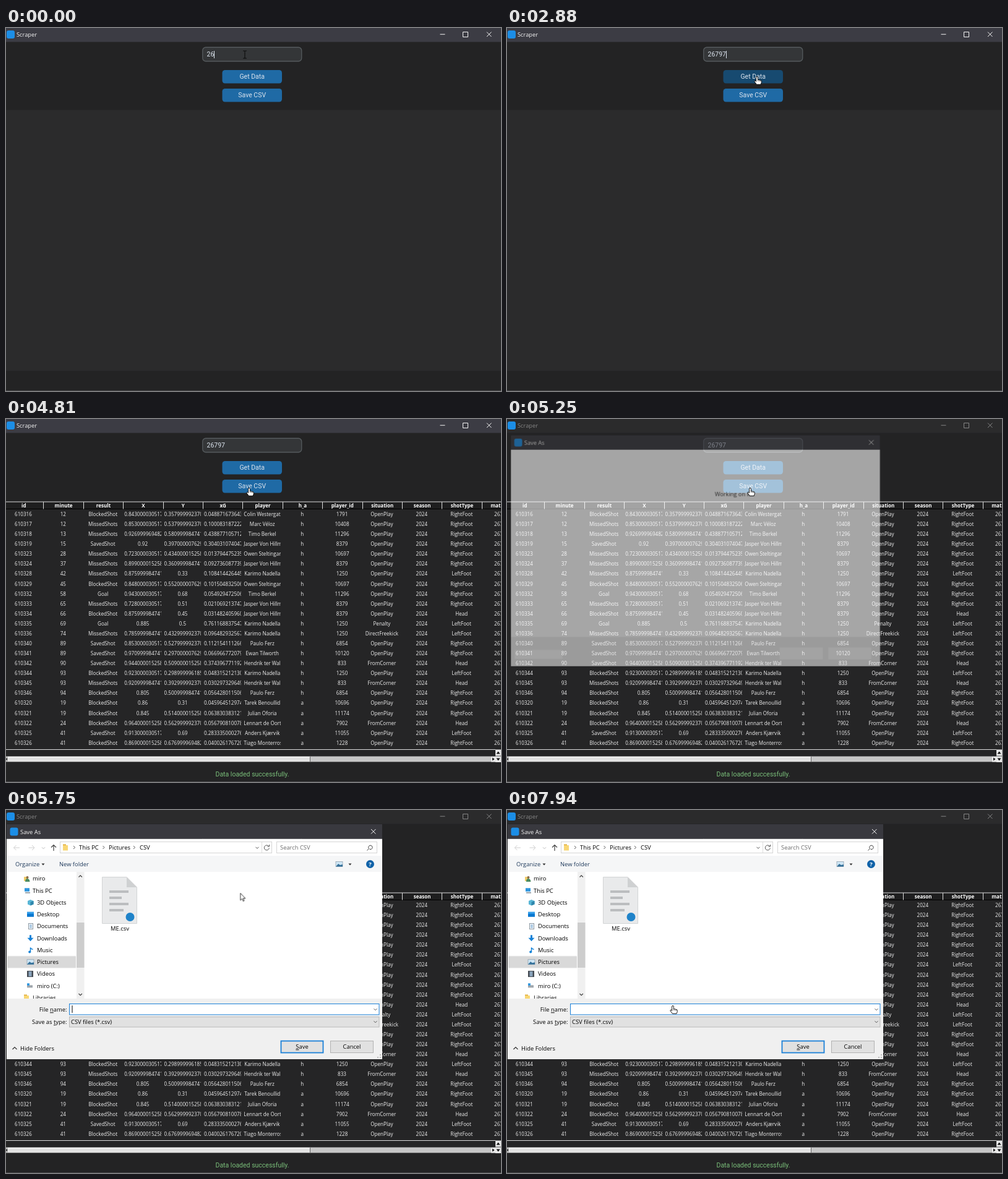
Animation, 800 px wide and 587 px high, one loop 8000 ms. Source, as an HTML page:

```html
<!DOCTYPE html>
<html lang="en">
<head>
<meta charset="utf-8">
<title>Scraper</title>
<style>
html, body { margin: 0; width: 100%; height: 100%; overflow: hidden; background: #232324; }
svg.layer { position: absolute; left: 0; top: 0; }
svg { font-family: "Open Sans", "Noto Sans", sans-serif; }
.roboto { font: 10.5px Roboto, sans-serif; }
.anim, .anim::after { animation: 8s step-end infinite; }

.bar { color: #f4f4f4; fill: #3c3c44; animation-name: deactivate; }
@keyframes deactivate { 64.9%, 100% { color: #858585; fill: #2b2b2c; } }
.get { fill: #1f6aa5; animation-name: hover-get; }
@keyframes hover-get { 18% { fill: #174a70; } 20.2% { fill: #1f6aa5; } 22.8% { fill: #174a70; } 48.3%, 100% { fill: #1f6aa5; } }
.save { fill: #1f6aa5; animation-name: hover-save; }
@keyframes hover-save { 20.6% { fill: #174a70; } 22% { fill: #1f6aa5; } 50.4% { fill: #174a70; } 59.4%, 100% { fill: #1f6aa5; } }

.entry { position: absolute; left: 324.5px; top: 36px; width: 30px; height: 13px; line-height: 13px;
  overflow: hidden; color: #dce4ee; animation-name: type; }
@keyframes type { 0% { width: 12.6px; } 3% { width: 18.5px; } 6% { width: 24.3px; } 11%, 100% { width: 30.1px; } }
.entry::after { content: ""; position: absolute; right: 0; top: 1px; width: 1px; height: 12px; background: #dce4ee; animation-name: entry-caret; }
@keyframes entry-caret { 18.5% { opacity: 0; } 22.2% { opacity: 1; } 45.7% { opacity: 0; } 49.5% { opacity: 1; } 57%, 100% { opacity: 0; } }

.data { animation-name: load; }
@keyframes load { 0% { visibility: hidden; } 38.25%, 100% { visibility: visible; } }
#table { position: absolute; left: -4px; top: 134px; width: 804px; height: 400px; overflow: hidden; display: grid;
  grid-template: 12px / repeat(13, 64.4px); grid-auto-rows: 16.09px; align-content: start;
  background: #252526; color: #f0f0f0; font: 8.1px "Open Sans", "Noto Sans", sans-serif; text-align: center; }
#table > * { overflow: hidden; white-space: nowrap; line-height: 16.5px; }
#table > span { margin: 0 2.6px 0 2px; }
#table > b { line-height: 12px; font-size: 8px; color: #fff; background: #1e1e1f; box-sizing: border-box;
  border: solid #ddd; border-width: 0 0 1px 1px; border-bottom-color: #000; }

.dialog { transform-origin: 304.5px 213px; animation: open 8s linear infinite; font-size: 9.4px; }
@keyframes open {
  0%, 64.9% { opacity: 0; transform: scale(.965); }
  65.6% { opacity: .58; transform: scale(.982); }
  66.4% { opacity: .86; transform: scale(.992); }
  67.2% { opacity: .95; transform: scale(.997); }
  68%, 100% { opacity: 1; transform: none; }
}
.loading { animation-name: loading; }
@keyframes loading { 66.6%, 100% { opacity: 0; } }
.content { animation-name: content; }
@keyframes content { 0% { opacity: 0; } 66.6%, 100% { opacity: 1; } }
.tree { animation-name: scroll; }
@keyframes scroll { 68.75%, 100% { transform: translateY(-186.5px); } }
.thumb { animation-name: thumb; }
@keyframes thumb { 0% { y: 114px; height: 109px; } 68.75%, 100% { y: 182px; height: 73px; } }
.caret { animation-name: name-caret; }
@keyframes name-caret { 73.5% { opacity: 0; } 80.1% { opacity: 1; } 86.7% { opacity: 0; } 93.4% { opacity: 1; } 98.8%, 100% { opacity: 0; } }

.pointer { animation: move 8s ease-in-out infinite; }
@keyframes move {
  0%, 12% { transform: translate(386px, 43px); }
  18% { transform: translate(396px, 66px); }
  21% { transform: translate(399px, 98px); }
  25% { transform: translate(402px, 84px); }
  29.75%, 46% { transform: translate(404px, 79px); }
  54%, 70% { transform: translate(393px, 112px); }
  76.5% { transform: translate(312px, 240px); }
  79%, 100% { transform: translate(268px, 317px); }
}
.ibeam { animation-name: ibeam; }
@keyframes ibeam { 15% { opacity: 0; } 78.8% { opacity: 1; } 98.8%, 100% { opacity: 0; } }
.arrow { animation-name: arrow; }
@keyframes arrow { 0% { opacity: 0; } 15% { opacity: 1; } 18% { opacity: 0; } 70.8% { opacity: 1; } 78.8%, 100% { opacity: 0; } }
.hand { animation-name: hand; }
@keyframes hand { 0% { opacity: 0; } 18% { opacity: 1; } 70.8% { opacity: 0; } 98.8%, 100% { opacity: 1; } }
</style>
</head>
<body>
<svg class="layer" id="window" width="800" height="587"></svg>
<div class="entry roboto anim">26797</div>
<div class="data anim" id="table"></div>
<svg class="layer data anim" id="scrollbars" width="800" height="587"></svg>
<svg class="layer dialog" id="dialog" width="800" height="587"></svg>
<svg class="layer" width="800" height="587">
  <g class="pointer">
    <path class="ibeam anim" d="M-3 -6H-.8L0 -5.3L.8 -6H3M0 -5.3V5.3M-3 6H-.8L0 5.3L.8 6H3" fill="none" stroke="#0c0c0c" stroke-width="1.1"/>
    <path class="arrow anim" d="M0 0V11.5L2.7 9L4.5 13L6.2 12.2L4.5 8.4H8Z" fill="#fff" stroke="#000" stroke-width=".8"/>
    <g class="hand anim" stroke="#000" stroke-width=".9">
      <path d="M-1.4 1.2Q-1.4 -.6 0 -.6T1.4 1.2V4.6Q2.9 4 3.3 5.1Q4.8 4.5 5.2 5.6Q7.2 5.2 7.2 7.2V9.4L6 12.3H-.6L-4 7.8Q-4.5 6 -2.7 6.3L-1.4 7.5Z" fill="#fff"/>
      <path d="M1.4 4.6V7M3.3 5.1V7.3M5.2 5.6V7.6" fill="none" stroke-width=".6"/>
    </g>
  </g>
</svg>
<script>
const put = (id, html) => document.getElementById(id).innerHTML = html;
const rect = (x, y, w, h, fill, more = '') => `<rect x="${x}" y="${y}" width="${w}" height="${h}" fill="${fill}" ${more}/>`;
const line = (d, color, width = 1) => `<path d="${d}" fill="none" stroke="${color}" stroke-width="${width}"/>`;
const shape = (d, fill) => `<path d="${d}" fill="${fill}"/>`;
const text = (x, y, s, more = '') => `<text x="${x}" y="${y}" dy=".35em" ${more}>${s}</text>`;
const middle = 'text-anchor="middle"';
const chevron = (x, y, color = '#555') => line(`M${x - 2.5} ${y - 1.2}l2.5 2.5l2.5 -2.5`, color);
const button = (cls, y, label) =>
  `<rect class="${cls} anim" x="349.5" y="${y}" width="96.500" height="21.500" rx="4.5"/>` +
  text(397.7, y + 10.4, label, `class="roboto" fill="#dce4ee" ${middle}`);
const appIcon = (x, y) => rect(x, y, 13, 13, '#1c8ee6', 'rx="3"');

put('window',
  rect(0, 132.5, 800, 422, '#2b2b2c') +
  `<g class="bar anim"><rect width="800" height="22.5"/>` +
  text(17, 11, 'Scraper', 'font-size="9.3" style="fill:currentColor"') +
  line('M701.5 10.2h8M738.5 6.5h8v8h-8zM777 6.5l7.5 7.5m0 -7.5l-7.5 7.5', 'currentColor') + '</g>' +
  appIcon(1, 4) +
  rect(317.75, 31.25, 160, 22.5, '#343638', 'rx="5" stroke="#565b5e" stroke-width="1.3"') +
  button('get', 68, 'Get Data') + button('save', 98, 'Save CSV') +
  rect(0, 586, 800, 1, '#48484a'));

// Shots: id, minute, result, x %, y %, expected goals, player key, situation and foot
const results = { B: 'BlockedShot', M: 'MissedShots', S: 'SavedShot', G: 'Goal' };
const feet = { R: 'RightFoot', L: 'LeftFoot', H: 'Head' };
const situations = { O: 'OpenPlay', P: 'Penalty', D: 'DirectFreekick', C: 'FromCorner' };
const players = {
  a: ['Colin Westergate', 1791], b: ['Marc Véloz', 10408], c: ['Timo Berkel', 11296],
  d: ['Jasper Von Hillmar', 8379], e: ['Owen Steltingar', 10697], f: ['Karimo Nadella', 1250],
  g: ['Paulo Ferz', 6854], h: ['Ewan Tilworth', 10120], i: ['Hendrik ter Wal', 833],
  j: ['Tarek Benoullid', 10696], k: ['Julian Oforia', 11174], l: ['Lennart de Oort', 7902],
  m: ['Anders Kjærvik', 11055], n: ['Tiago Monterros', 1228]
};
const shots = `316 12 B 84.3 35.8 0.048871673643 a OR
317 12 M 85.3 53.8 0.100083187222 b OR
318 13 M 92.7 58.1 0.438877105712 c OR
319 15 S 92 39.7 0.304031074047 d OR
323 28 M 72.3 43.4 0.013794475235 e OR
324 37 M 89.9 36.1 0.092736087739 d OR
328 42 M 87.6 33 0.108414426445 f OL
329 45 B 84.8 55.2 0.101504832506 e OR
332 58 G 94.3 68 0.054929472506 c OR
333 65 M 72.8 51 0.021069213747 d OR
334 66 B 87.6 45 0.031482405960 d OH
335 69 G 88.5 50 0.761168837547 f PL
336 74 M 78.6 43.3 0.096482932567 f DL
340 89 S 85.3 52.8 0.112154111266 g OR
341 89 S 97.1 29.7 0.066966772079 h OR
342 90 S 94.4 50.9 0.374396771192 i CH
344 93 B 92.3 29.9 0.048315212130 f OL
345 93 M 92.1 39.3 0.030297329649 i CH
346 94 B 80.5 50.1 0.056428011506 g OR
320 19 B 86 31 0.045964512974 j OR
321 19 B 84.5 51.4 0.063830383121 k OR
322 24 B 96.4 56.3 0.056790810078 l CH
325 41 S 91.3 69 0.283335000276 m OL
326 41 B 86.9 67.7 0.040026176720 n OR`.split('\n');
const heads = 'id minute result X Y xG player h_a player_id situation season shotType match_id'.split(' ');
// Coordinates carry single-precision rounding
const share = v => String(Math.fround(v) / 100);
const rows = shots.map((s, i) => {
  const [id, minute, result, x, y, xg, key, kind] = s.split(' ');
  const [name, playerId] = players[key];
  return ['610' + id, minute, results[result], share(x), share(y), xg, name, i < 19 ? 'h' : 'a',
    playerId, situations[kind[0]], 2024, feet[kind[1]], 26797];
});
put('table', heads.map(h => `<b>${h}</b>`).join('') + rows.flat().map(c => `<span>${c}</span>`).join(''));

put('scrollbars',
  rect(0, 133.5, 800, 1, '#d8d8d8') + rect(0, 535, 800, 11, '#252526') + rect(0, 534, 791, 1, '#dcdcdc') +
  rect(0, 545.5, 791, 9.5, '#c6c6c6') + rect(3, 546, 488, 8.5, '#e2e2e2') +
  line('M3 546.5H491', '#fff') + line('M0 554.5H791M491.5 546V555', '#666') +
  rect(784, 546, 7, 8.5, '#e8e8e8') + shape('M786 547.5l3.5 2.5l-3.5 2.5z', '#111') + shape('M2 547.5v5l-2 -2.5z', '#111') +
  rect(791, 534.5, 9, 20.5, '#e8e8e8') + line('M791 545H800', '#555') +
  shape('M792.5 541.5h6l-3 -4zM792.5 548.5h6l-3 4z', '#111') +
  text(398, 574.5, 'Data loaded successfully.', `class="roboto" fill="#7abf7a" ${middle}`));

// Navigation icons, drawn in an 11 by 10 box
const icons = {
  folder: rect(1, 0, 5, 3, '#e0ab35') + rect(1, 1.5, 8, 8.5, '#f8d775'),
  star: shape('M5.5 0l1.5 3.5l4 .3l-3 2.7l1 3.8l-3.5 -2l-3.5 2l1 -3.8l-3 -2.7l4 -.3z', '#2f8fdc'),
  screen: rect(0, 1, 11, 8, '#0a78d0') + rect(0, 1, 11, 3, '#35a0ea'),
  note: line('M4.5 8V1q1 2.5 4 3', '#1683d8', 1.5) + '<circle cx="3.2" cy="8" r="2" fill="#1683d8"/>',
  user: rect(1, 2, 6, 7, '#f0cd6a') + '<circle cx="6.5" cy="3" r="2" fill="#8a6a48"/>' + shape('M3 10q0 -5 3.5 -5t4 5z', '#4b8b62'),
  pc: rect(1, 1, 8, 5.5, '#2e96de') + line('M2 8.5h8', '#7b8a95', 1.5),
  cube: shape('M1 2.5l4.5 -2l5 2v5.5l-5 2l-4.5 -2z', '#59b6d6') + shape('M5.5 4.5l5 -2v5.5l-5 2z', '#2f86ab'),
  page: rect(1.5, .5, 7, 9, '#fff', 'stroke="#8896a2"') + line('M3 3h4m-4 2h4m-4 2h4', '#4d8ec4', .9),
  down: shape('M4 0h3v4.5h3.5l-5 5.5l-5 -5.5H4z', '#1683d8'),
  photo: rect(0, 1, 11, 8, '#cfe6f5', 'stroke="#8899a5" stroke-width=".7"') + shape('M0 9l4 -4.5l3 2l4 -1v3.5z', '#35719a'),
  film: rect(0, 0, 10, 10, '#454b52') + rect(2.5, 1, 5, 8, '#8aa4bd'),
  drive: rect(1, 4, 9, 4, '#a0a7ad') + rect(1, 1, 4, 3.5, '#2e96de')
};
const icon = (name, x, y) => `<g transform="translate(${x} ${y - 5})">${icons[name]}</g>`;
const nav = [
  ['star', 23, 37, 'Quick access'], ['folder', 28, 44, 'Corvu'], ['folder', 28, 44, 'Diary Crate'],
  ['folder', 28, 44, 'Corvu Photo'], ['folder', 28, 44, '200CLIPS'], ['screen', 28, 44, 'Desktop'],
  ['note', 29, 44, 'Music'], ['folder', 28, 44, 'Survey'],
  ['screen', 22, 37, 'Desktop'], ['user', 28, 43, 'miro'], ['pc', 29, 43, 'This PC'],
  ['cube', 34, 50, '3D Objects'], ['screen', 34, 50, 'Desktop'], ['page', 35, 50, 'Documents'],
  ['down', 34, 50, 'Downloads'], ['note', 35, 50, 'Music'], ['photo', 34, 50, 'Pictures'],
  ['film', 34, 50, 'Videos'], ['drive', 33, 50, 'miro (C:)'], ['folder', 28, 43, 'Libraries']
];
const navY = i => i < 8 ? 117.3 + 19.35 * i : 278.3 + 19.25 * (i - 8);
const tree = rect(2, navY(16) - 9.6, 111, 19.2, '#d9d9d9') + nav.map(([name, x, tx, label], i) =>
  icon(name, x, navY(i)) + text(tx, navY(i), label) +
  (i > 0 && i < 4 ? line(`M104 ${navY(i) + 3}l3 -3m-2 -2l4 4m-2.5 -4l3 3l1.5 -2l-2.5 -2.5z`, '#777', .9) : '')).join('');

const pushButton = (x, w, label, border, width) =>
  rect(x, 373.5, w, 19, '#e1e1e1', `stroke="${border}" stroke-width="${width}"`) + text(x + w / 2, 383, label, middle);
const key = c => `<tspan text-decoration="underline">${c}</tspan>`;
const box = 'stroke="#d5d5d5"';
const right = 'text-anchor="end"';

const content =
  rect(1, 74, 607, 26, '#f5f6f7') + rect(1, 305, 607, 98, '#f0f0f0') +
  line('M22 61H12.5m4 -4l-4 4l4 4M36.5 61H46m-4 -4l4 4l-4 4', '#cfcfcf') + chevron(60.5, 61.5, '#bbb') +
  line('M77 66V56.5m-4 4l4 -4l4 4', '#444', 1.2) +
  rect(87.5, 51.5, 342, 18, '#fff', box) + rect(437.5, 51.5, 162, 18, '#fff', box) + line('M413.5 52V69', '#ddd') +
  icon('folder', 91, 60.5) + [110, 157.5, 207].map(x => line(`M${x - 1} 58l2.5 2.5l-2.5 2.5`, '#555')).join('') +
  text(118, 60.5, 'This PC') + text(166, 60.5, 'Pictures') + text(216, 60.5, 'CSV') + chevron(406, 61) +
  line('M424.5 58.5a4 4 0 1 0 .8 3M425.5 56v3h-3', '#555') +
  text(443, 61, 'Search CSV', 'fill="#6d6d6d"') + line('M583.5 65.5l3 -3a3.2 3.2 0 1 1 1 .8', '#444') +
  text(15, 88, 'Organize', 'fill="#1e395b"') + text(86, 88, 'New folder', 'fill="#1e395b"') +
  shape('M57.5 86.5h5l-2.5 3zM553.5 86.5h5l-2.5 3z', '#333') + icon('photo', 533, 87.5) +
  '<circle cx="588.5" cy="87.5" r="6.5" fill="#0f62a8"/>' + text(588.5, 87.5, '?', `fill="#fff" font-weight="bold" ${middle}`) +
  `<svg x="0" y="100" width="113" height="205" viewBox="0 100 113 205"><g class="tree anim">${tree}</g></svg>` +
  rect(114, 100, 12.5, 205, '#f0f0f0') + `<rect class="thumb anim" x="114" y="114" width="12.5" height="109" fill="#cdcdcd"/>` +
  line('M117.5 108.5l2.7 -2.7l2.7 2.7M117.5 297l2.7 2.7l2.7 -2.7', '#444', 1.2) +
  shape('M155.5 108.5H195L211.5 125V183.5H155.5z', '#e9eaeb') + line('M155.5 108.5H195L211.5 125V183.5H155.5z', '#d2d4d5') +
  shape('M195 108.5V125H211.5z', '#cfd1d2') +
  line('M167 132h31M167 142h20M167 152h31M167 162h23', '#bbbdbf', 4) +
  '<circle cx="200.5" cy="173" r="7" fill="#1f83c9"/>' + text(184, 191.5, 'ME.csv', middle) +
  text(98.5, 323, `File ${key('n')}ame:`, right) + text(98.5, 343, `Save as ${key('t')}ype:`, right) +
  rect(102.5, 313.5, 500.5, 17.5, '#fff', 'stroke="#1a80d8"') + rect(102.5, 334.5, 500.5, 16.5, '#e1e1e1', 'stroke="#b8b8b8"') +
  `<rect class="caret anim" x="106.5" y="316" width="1" height="12"/>` +
  text(105, 343, 'CSV files (*.csv)') + chevron(597, 322.5) + chevron(597, 342.5) +
  pushButton(444.5, 68, key('S') + 'ave', '#1a80d8', 1.8) + pushButton(524.5, 69, 'Cancel', '#b2b2b2', 1) +
  line('M10.5 387l3.5 -3.5l3.5 3.5', '#333', 1.2) + text(23, 385.5, 'Hide Folders') +
  shape('M604 395h2v2h-2zM604 399h2v2h-2zM600 399h2v2h-2z', '#bbb');

const loading =
  rect(1, 355, 607, 48, '#ececec') + text(336.5, 119.5, 'Working on it...', 'fill="#333"') +
  rect(7, 376, 79, 15, '#fafafa') + rect(443, 372, 71, 20, '#fafafa') + rect(523, 372, 71, 20, '#fafafa');

put('dialog',
  rect(1, 46.5, 607, 356.5, '#fff') + rect(1, 23, 607, 23.5, '#39393f') +
  appIcon(6.5, 28.5) + text(23, 35.5, 'Save As', 'fill="#f4f4f4"') +
  line('M590 31l7.5 7.5m0 -7.5l-7.5 7.5', '#f4f4f4') +
  `<g class="loading anim">${loading}</g><g class="content anim">${content}</g>`);
</script>
</body>
</html>
```
